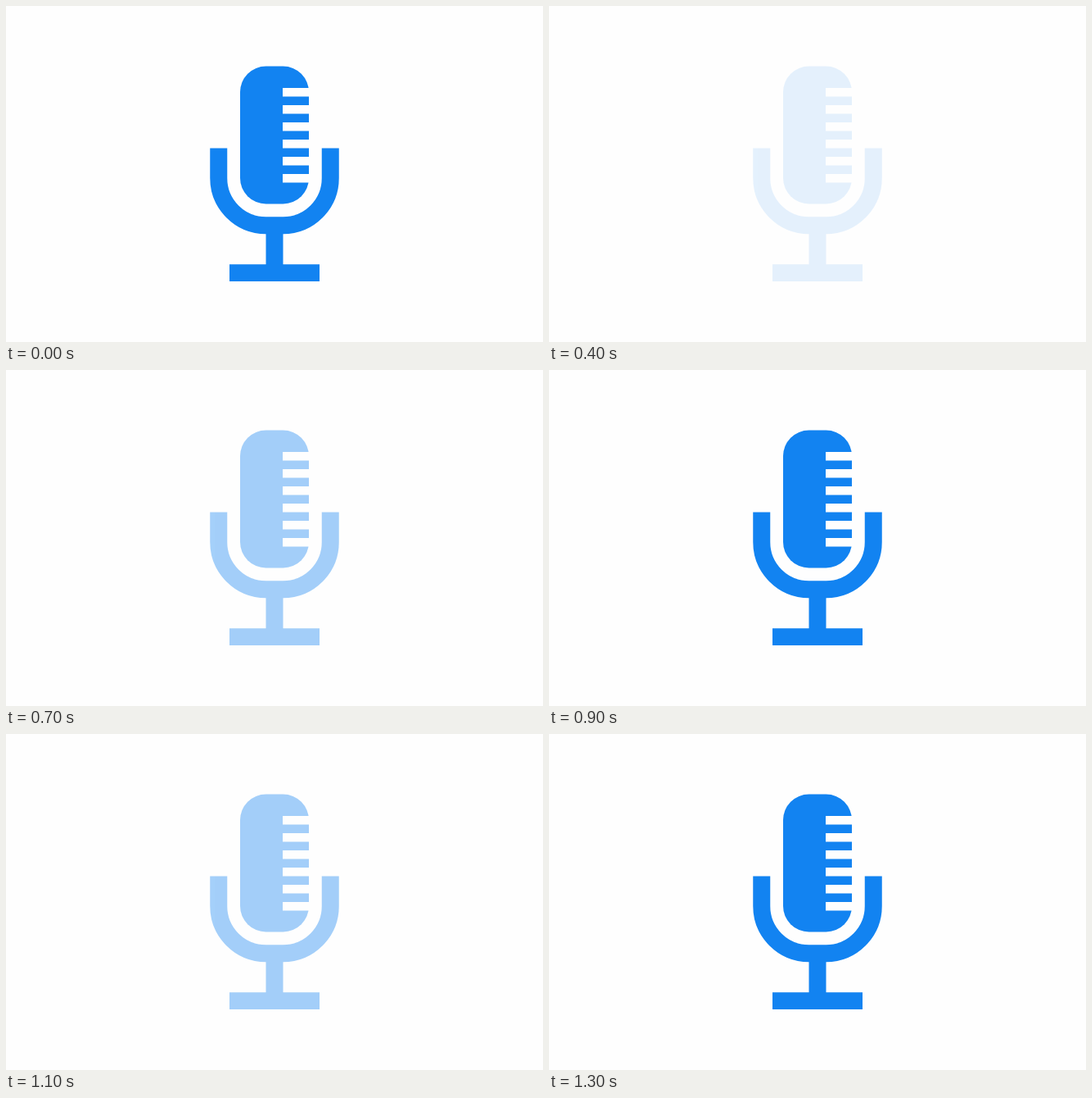
These frames come from a looping animation (656 px wide and 410 px high, 1700 ms). An HTML page:

```html
<!DOCTYPE html>
<html lang="en">
<head>
<meta charset="utf-8">
<title>Pulsing microphone</title>
<style>
  html, body { margin: 0; width: 100%; height: 100%; overflow: hidden; background: #fefefe; }
  svg { display: block; width: 100%; height: 100%; }
</style>
</head>
<body>
<svg viewBox="0 0 656 410">
  <g id="mic" fill="#1283f1">
    <rect x="286" y="73.5" width="84" height="168" rx="31.5"/>
    <path d="M338 105.25h33m-33 21h33m-33 21h33m-33 21h33m-33 21h33m-33 21h33"
          stroke="#fefefe" stroke-width="10.5"/>
    <path d="M259.75 173.5V210a57.75 57.75 0 0 0 57.75 57.75h21A57.75 57.75 0 0 0 396.25 210V173.5"
          fill="none" stroke="#1283f1" stroke-width="21"/>
    <path d="M317.5 268h21v47.25H383V336H273v-20.75h44.5z"/>
  </g>
</svg>
<script>
  const LOOP = 1700, STEP = 100;
  // One deep pulse, one shallow pulse, then a rest at full strength.
  const levels = [1, .67, .42, .2, .105, .1, .18, .38, .67, 1, .67, .38, .67, 1];
  const mic = document.getElementById('mic');
  const start = performance.now();

  function draw(now) {
    const step = Math.floor((Math.max(0, now - start) % LOOP) / STEP);
    mic.setAttribute('opacity', levels[Math.min(step, levels.length - 1)]);
    requestAnimationFrame(draw);
  }
  draw(start);
</script>
</body>
</html>
```
